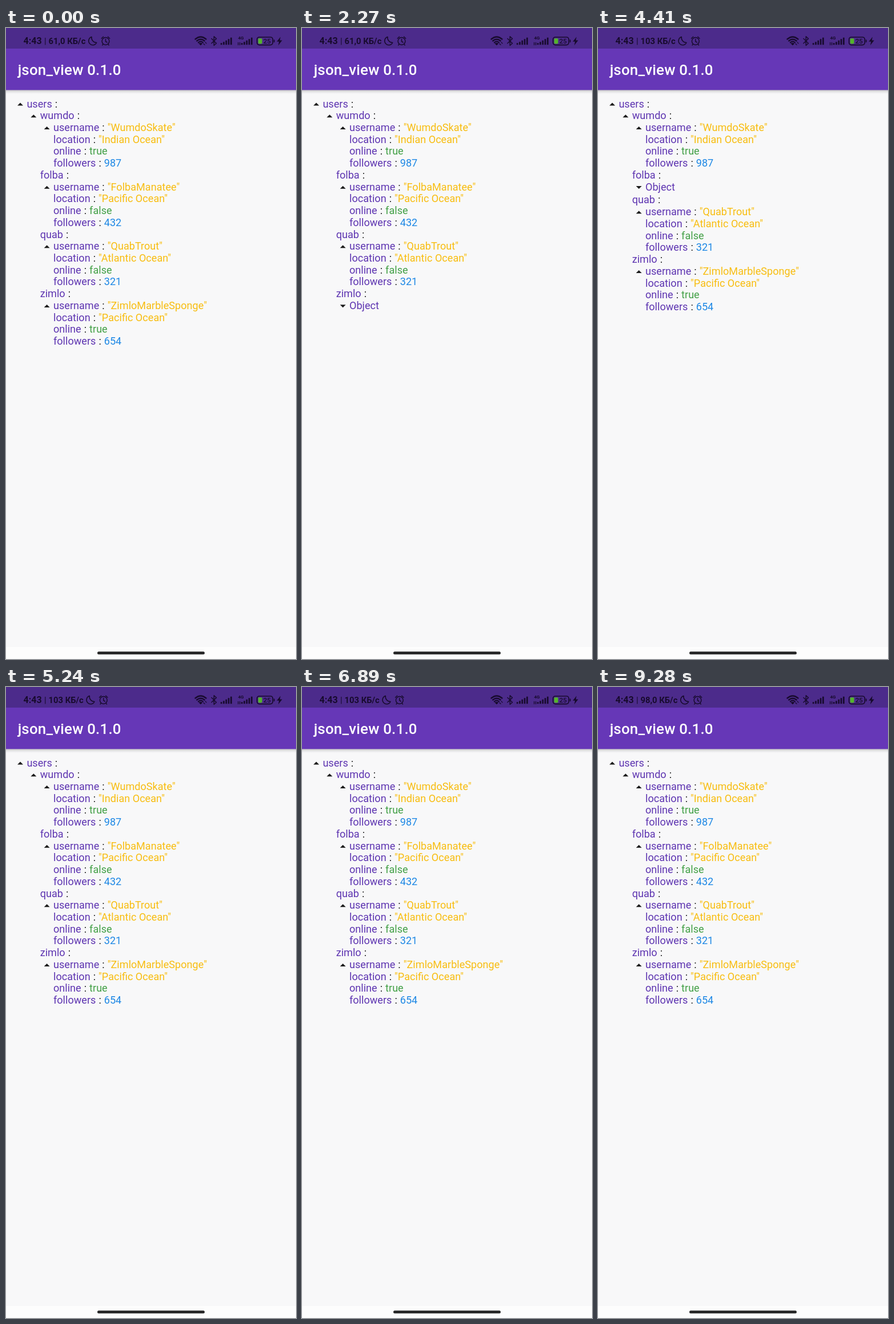
An HTML page that plays this animation: 508x1102 px, repeating every 9.44 s.

```html
<!DOCTYPE html>
<html lang="en">
<head>
<meta charset="utf-8">
<title>json_view</title>
<style>
  html, body { margin: 0; width: 100%; height: 100%; overflow: hidden; background: #f8f8f9; }
  svg { display: block; width: 100%; height: 100%; font-family: Roboto, sans-serif; }
  .title { font-size: 25.87px; font-weight: 500; letter-spacing: .194px; fill: #fff; }
  .status { fill: #180b2e; font-weight: 700; }
  .line { fill: none; stroke: #180b2e; stroke-width: 1.5; stroke-linecap: round; stroke-linejoin: round; }
  #tree { font-size: 18.1px; }
  .key { fill: #5e35b1; }
  .colon, .arrow { fill: #1c1c1c; }
  .string { fill: #f8bd10; }
  .boolean { fill: #43a047; }
  .number { fill: #1e88e5; }
</style>
</head>
<body>
<svg viewBox="0 0 508 1102" xmlns="http://www.w3.org/2000/svg">
  <defs>
    <linearGradient id="shade" x2="0" y2="1">
      <stop stop-color="#000" stop-opacity=".24"/>
      <stop offset=".4" stop-color="#000" stop-opacity=".09"/>
      <stop offset="1" stop-color="#000" stop-opacity="0"/>
    </linearGradient>
    <g id="bars">
      <path d="M1.7 15.5v-3M6 15.5v-5M10.3 15.5V8M14.6 15.5V5.5M18.9 15.5V3" fill="none" stroke="#180b2e" stroke-width="2.7"/>
    </g>
  </defs>

  <rect width="508" height="1102" fill="#f8f8f9"/>
  <rect y="1081" width="508" height="21" fill="#fdfdfd"/>
  <rect x="160" y="1089" width="188" height="5" rx="2.5" fill="#2b2b2b"/>
  <rect y="108" width="508" height="7" fill="url(#shade)"/>
  <rect width="508" height="108.3" fill="#6637b7"/>
  <rect width="508" height="36" fill="#4c2b8b"/>
  <text class="title" x="20.7" y="81.5">json_view 0.1.0</text>

  <g class="status">
    <text x="30.5" y="28" font-size="16">4:43</text>
    <text x="67" y="27.5" font-size="14.8" font-weight="400">|</text>
    <text id="speed" x="74.5" y="28" font-size="14.8"></text>
    <g id="modes" class="line">
      <path d="M150 15.5A7.3 7.3 0 1 0 158.7 25.5A8.6 8.6 0 0 1 150 15.5Z"/>
      <circle cx="174.5" cy="23" r="6.4"/>
      <path d="M174.5 19.5V23.5L177 25M167.3 18.2L170.5 15.3M178.5 15.3L181.7 18.2M170 28.5L168.8 30M179 28.5L180.2 30"/>
    </g>

    <g class="line" stroke-width="2">
      <path d="M331.5 19.5Q341 11.5 350.5 19.5M334.3 22.5Q341 17 347.7 22.5M337 25.3Q341 22 345 25.3" style="stroke-width:2.3"/>
      <path d="M338.3 27.2L341 30L343.7 27.2Q341 25.4 338.3 27.2Z" fill="#180b2e" style="stroke-width:1"/>
      <path d="M346 27.5L348.2 29.5M349 25L351.2 27" style="stroke-width:1.1"/>
      <path d="M360 18.5L368.5 26.7L364.3 30.5V14.8L368.5 18.6L360 26.8"/>
    </g>
    <use href="#bars" x="375.5" y="13.8"/>
    <use href="#bars" x="411.5" y="13.8"/>
    <text x="406.5" y="20" font-size="8">4G</text>
    <path class="line" d="M406.7 29.5V25.5M409.6 25.5V29.5" style="stroke-width:1.3"/>

    <rect x="439.7" y="16" width="27.6" height="13.6" rx="4" class="line" style="stroke-width:1.7"/>
    <rect x="441.8" y="18.2" width="6.8" height="9.3" rx="1.4" fill="#54b52b"/>
    <text x="457.3" y="27" font-size="11.5" text-anchor="middle" font-weight="500">25</text>
    <path d="M468.8 20.3h.6q1.2 0 1.2 1.2v2.6q0 1.2-1.2 1.2h-.6z"/>
    <path d="M480.8 15.5L474.4 23.8H478.2L477 30.3L483.8 21.5H479.8Z"/>
  </g>
  <g id="tree"></g>
</svg>
<script>
const LOOP = 9440, ROW = 20.73, INDENT = 23.3, OBJECT_EXTRA = 2.1;
const member = (username, location, online, followers) => ({ username, location, online, followers });
const data = {
  users: {
    wumdo: member('WumdoSkate', 'Indian Ocean', true, 987),
    folba: member('FolbaManatee', 'Pacific Ocean', false, 432),
    quab: member('QuabTrout', 'Atlantic Ocean', false, 321),
    zimlo: member('ZimloMarbleSponge', 'Pacific Ocean', true, 654)
  }
};

// [start in ms, path of the folded node or null]
const folds = [
  [0, null], [960, '/users/zimlo'], [3430, null], [4370, '/users/folba'], [4870, null],
  [5650, '/users'], [6800, null], [7880, ''], [8490, null]
];
// [start in ms, speed label, shift of the icons after it]
const speeds = [[0, '61,0 КБ/с', 0], [3880, '103 КБ/с', -3.7], [7880, '98,0 КБ/с', 0]];

const $ = id => document.getElementById(id);
const at = (table, time) => table.findLast(step => step[0] <= time);

function treeMarkup(folded) {
  let y = 138.5, out = '';
  const left = depth => 36.4 + INDENT * depth;
  const arrow = (depth, down) => {
    const x = left(depth) - 11.4, s = down ? 1 : -1, mid = y - 5.3;
    out += `<path class="arrow" d="M${x - 5} ${mid - 2.4 * s}h10l-5 ${5 * s}z"/>`;
  };
  const line = (depth, spans) => {
    out += `<text x="${left(depth)}" y="${y}">${spans}</text>`;
    y += ROW;
  };
  const key = name => `<tspan class="key">${name}</tspan>`;

  (function walk(node, depth, path) {
    const down = path === folded;
    arrow(depth, down);
    if (down) {
      line(depth, key('Object'));
      y += OBJECT_EXTRA;
      return;
    }
    for (const [name, value] of Object.entries(node)) {
      const label = key(name) + '<tspan class="colon" dx="5">:</tspan>';
      if (typeof value === 'object') {
        line(depth, label);
        walk(value, depth + 1, `${path}/${name}`);
      } else {
        line(depth, `${label}<tspan class="${typeof value}" dx="5">${JSON.stringify(value)}</tspan>`);
      }
    }
  })(data, 0, '');
  return out;
}

let shownFold, shownSpeed;
function draw() {
  const time = performance.now() % LOOP;
  const fold = at(folds, time), speed = at(speeds, time);
  if (fold !== shownFold) {
    $('tree').innerHTML = treeMarkup(fold[1]);
    shownFold = fold;
  }
  if (speed !== shownSpeed) {
    $('speed').textContent = speed[1];
    $('modes').setAttribute('transform', `translate(${speed[2]})`);
    shownSpeed = speed;
  }
  requestAnimationFrame(draw);
}
draw();
</script>
</body>
</html>
```
